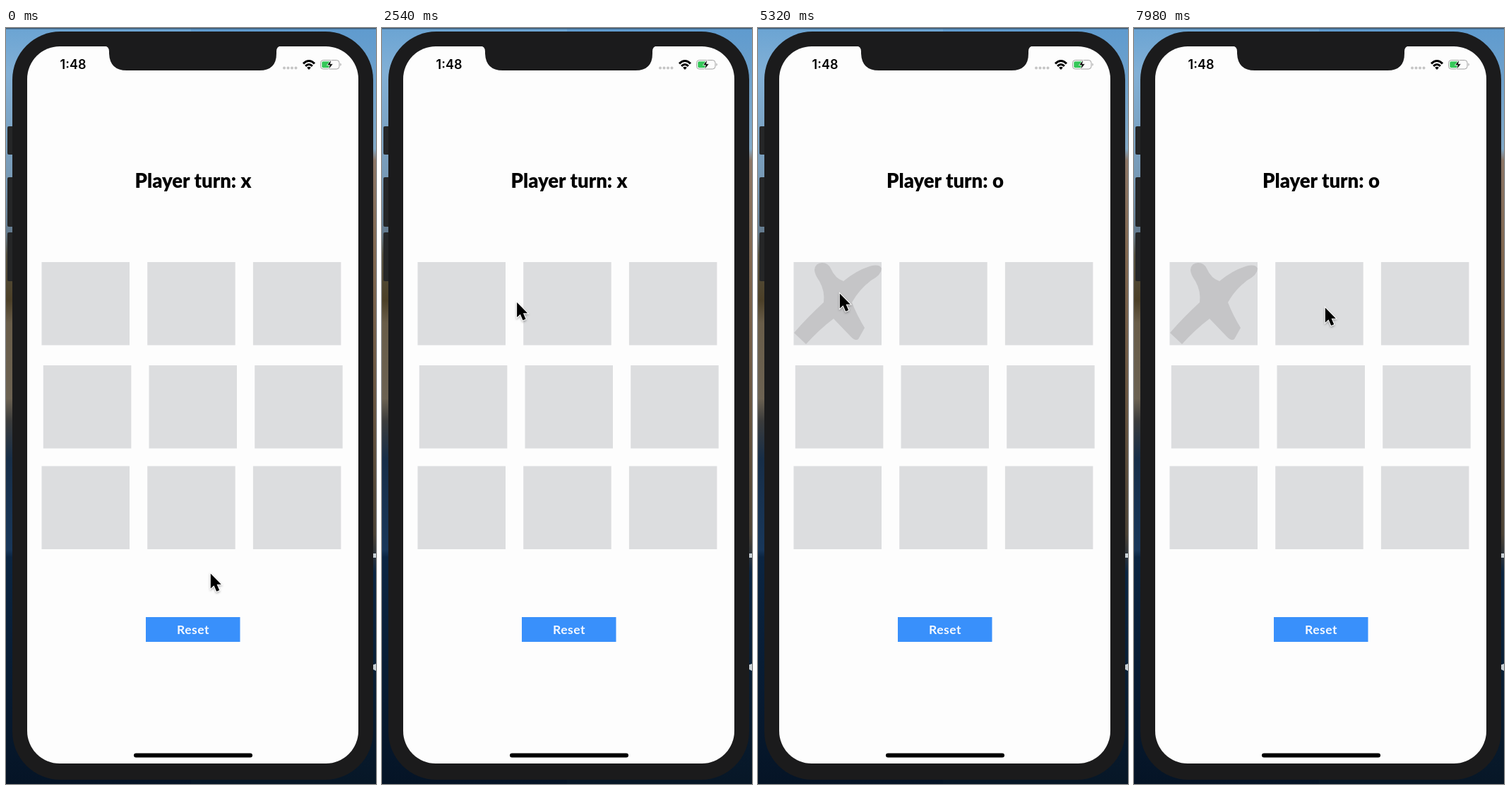
Recreate the animation shown at these times as an HTML page. Size 524x1069 px, loop 8 s.

```html
<!DOCTYPE html>
<html lang="en">
<head>
<meta charset="utf-8">
<title>Noughts and crosses</title>
<style>
  html, body { margin: 0; width: 100%; height: 100%; overflow: hidden; background: #06182e; }
  svg { display: block; width: 100%; height: 100%; }
  text { text-anchor: middle; }
  .marker { font-family: Lato, "Open Sans", sans-serif; }
  .clock { font: 600 18px Inter, Roboto, sans-serif; }
</style>
</head>
<body>
<svg viewBox="0 0 524 1069" preserveAspectRatio="none">
  <defs>
    <linearGradient id="left" x2="0" y2="1">
      <stop offset="0" stop-color="#6ba4d3"/>
      <stop offset=".06" stop-color="#82b0d6"/>
      <stop offset=".2" stop-color="#7799b5"/>
      <stop offset=".27" stop-color="#647b8e"/>
      <stop offset=".3" stop-color="#55503e"/>
      <stop offset=".36" stop-color="#4c4028"/>
      <stop offset=".39" stop-color="#695d49"/>
      <stop offset=".49" stop-color="#6c6252"/>
      <stop offset=".52" stop-color="#3b3c3c"/>
      <stop offset=".57" stop-color="#172e48"/>
      <stop offset=".69" stop-color="#18375a"/>
      <stop offset=".7" stop-color="#0b2542"/>
      <stop offset="1" stop-color="#051426"/>
    </linearGradient>
    <linearGradient id="right" x2="0" y2="1">
      <stop offset="0" stop-color="#5f9bcf"/>
      <stop offset=".16" stop-color="#82a9c7"/>
      <stop offset=".175" stop-color="#8b7565"/>
      <stop offset=".3" stop-color="#80674f"/>
      <stop offset=".5" stop-color="#67543f"/>
      <stop offset=".67" stop-color="#4b4235"/>
      <stop offset=".7" stop-color="#28313b"/>
      <stop offset=".72" stop-color="#0a2542"/>
      <stop offset="1" stop-color="#071727"/>
    </linearGradient>
    <filter id="shadow" x="-50%" y="-50%" width="200%" height="200%">
      <feDropShadow dx="0" dy="1.5" stdDeviation="1.4" flood-opacity=".35"/>
    </filter>
  </defs>

  <rect width="262" height="1069" fill="url(#left)"/>
  <rect x="262" width="262" height="1069" fill="url(#right)"/>
  <rect width="524" height="1.5" fill="#3c5a75"/>
  <path d="M518 743h6v6h-6zM518 901l6-2v10l-6-3z" fill="#c8d0d5"/>

  <g fill="#252627">
    <rect x="2" y="139" width="10" height="40" rx="2"/>
    <rect x="2" y="211" width="10" height="70" rx="2"/>
    <rect x="2" y="289" width="10" height="69" rx="2"/>
  </g>
  <rect x="9" y="5" width="511" height="1058" rx="68" fill="#1b1b1c"/>
  <rect x="30" y="26" width="469" height="1014" rx="46" fill="#fdfdfd"/>
  <path d="M139 25Q146 26 146 33V36Q147 60 171 60H359Q383 60 383 36V33Q383 26 390 25Z" fill="#1b1b1c"/>

  <text class="clock" x="95" y="58">1:48</text>
  <g fill="#c5c5c5">
    <circle cx="394" cy="56.5" r="2"/><circle cx="399.5" cy="56.5" r="2"/>
    <circle cx="405" cy="56.5" r="2"/><circle cx="410.5" cy="56.5" r="2"/>
  </g>
  <g fill="none" stroke="#000" stroke-width="3">
    <path d="M421 50.4Q429 42.6 437 50.4"/>
    <path d="M424.1 53.8Q429 49.2 433.9 53.8"/>
  </g>
  <path d="M426.2 56Q429 53.7 431.8 56L429 58.9Z"/>
  <rect x="445.5" y="45.5" width="26.5" height="12.5" rx="3.8" fill="none" stroke="#a2a2a2"/>
  <path d="M473.5 49.5Q476 51.7 473.5 54Z" fill="#a2a2a2"/>
  <rect x="447.3" y="47.3" width="12" height="9" rx="2" fill="#35c759"/>
  <path d="M461 44.5L454.5 52.6H458.3L456.5 59L463.3 50.7H459.4Z" stroke="#fdfdfd" stroke-width=".8"/>

  <text id="turn" class="marker" x="265" y="226" font-size="27.5" font-weight="900"></text>
  <g id="cells" fill="#dcdddf"></g>
  <path id="cross" fill="#c5c5c7" d="M80 342Q81 332 91 332Q99 332 103 340Q109 354 121 358Q139 343 158 337Q172 333 175 340Q175 349 160 357Q143 370 133 388Q140 406 151 424L142 440Q138 443 132 437L107 411Q87 426 68 447L51 431Q70 409 93 388Q95 372 87 358Q80 348 80 342Z"/>

  <rect x="198" y="833" width="133.500" height="35" fill="#3990fb"/>
  <text class="marker" x="265" y="857" font-size="17.5" font-weight="700" letter-spacing=".5" fill="#f4f8ff">Reset</text>
  <rect x="181" y="1025.500" width="168" height="6" rx="3"/>

  <path id="cursor" d="M.8 1.500V22.500L5.500 18.200L9.200 26.700L13.200 25L9.600 16.700H15.800Z"
    stroke="#fff" stroke-width="1.8" paint-order="stroke" filter="url(#shadow)"/>
</svg>
<script>
const LOOP = 8000, MARK_TIME = 4800;
const byId = id => document.getElementById(id);
const turn = byId('turn'), cross = byId('cross'), cursor = byId('cursor');

// time, x, y, then velocity in pixels per ms
const path = [
  [0, 289, 770, 0, 0],
  [1940, 216, 519, -.04, -.16],
  [3200, 175, 291, 0, 0],
  [4250, 115, 374, 0, 0],
  [5350, 115, 374, 0, 0],
  [6460, 257, 391, .015, .003],
  [7980, 270, 394, 0, 0]
];

byId('cells').innerHTML = [[50.5, 331], [52.8, 477], [50.5, 619.5]].map(([left, y]) =>
  [0, 1, 2].map(col => `<rect x="${left + col * 149.7}" y="${y}" width="124.500" height="117.500"/>`).join('')
).join('');

function cursorAt(t) {
  const next = path.findIndex(key => key[0] > t);
  if (next < 0) return path[path.length - 1].slice(1, 3);
  const a = path[next - 1], b = path[next];
  const span = b[0] - a[0], u = (t - a[0]) / span;
  const ease = u * u * (3 - 2 * u);
  return [1, 2].map(i =>
    a[i] + (b[i] - a[i]) * ease
    + span * u * (1 - u) * (a[i + 2] * (1 - u) - b[i + 2] * u));
}

function draw(t) {
  const marked = t >= MARK_TIME;
  turn.textContent = 'Player turn: ' + (marked ? 'o' : 'x');
  cross.style.display = marked ? '' : 'none';
  cursor.setAttribute('transform', `translate(${cursorAt(t)})`);
}

const start = performance.now();
function tick() {
  draw((performance.now() - start) % LOOP);
  requestAnimationFrame(tick);
}
tick();
</script>
</body>
</html>
```
